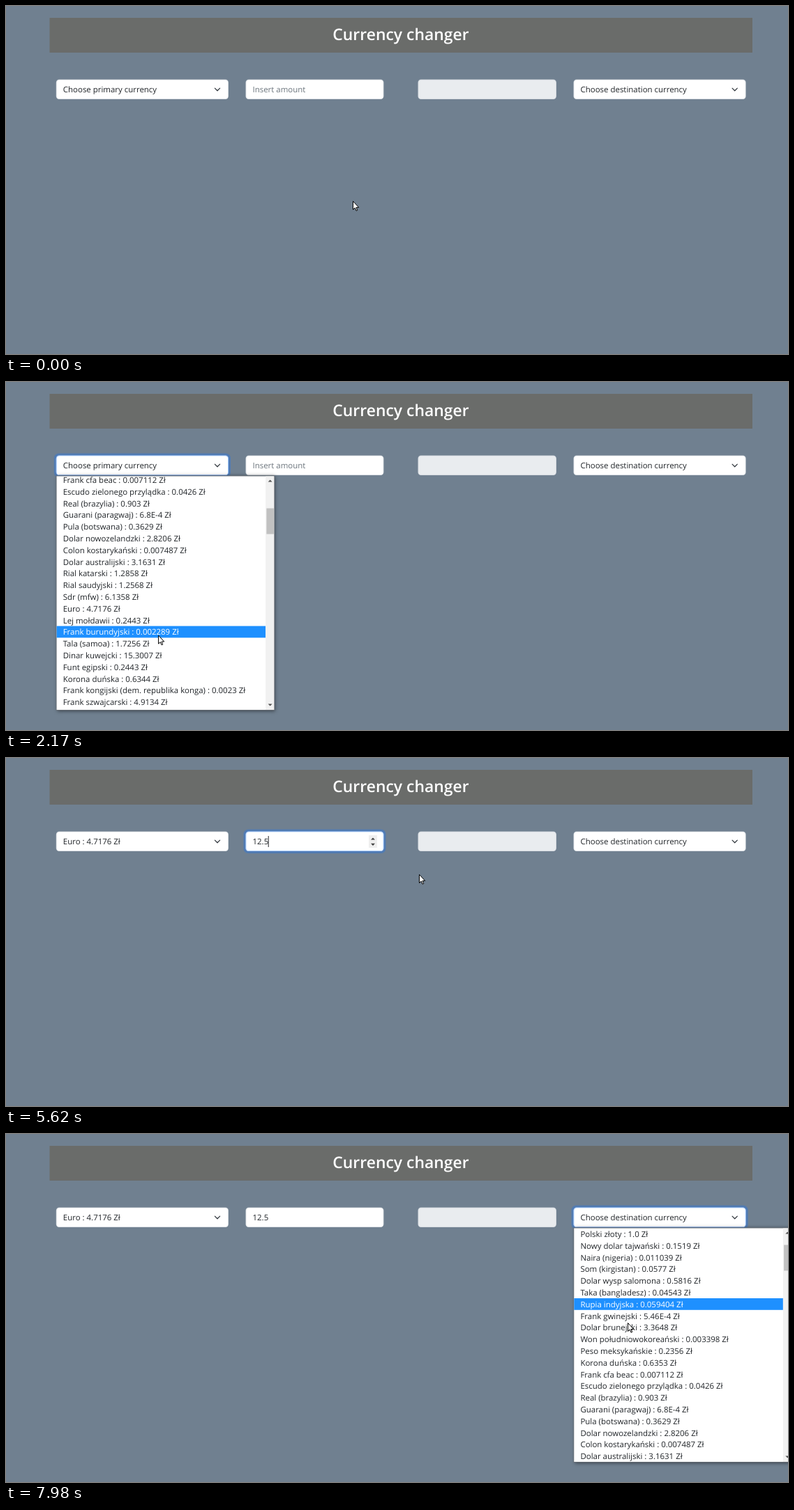
An HTML page with a canvas that plays this animation: 1121 px wide and 500 px high, repeating every 8 s.

```html
<!DOCTYPE html>
<html lang="en">
<head>
<meta charset="utf-8">
<title>Currency changer</title>
<style>
html, body { margin: 0; width: 100%; height: 100%; overflow: hidden; background: #708090; }
canvas { display: block; }
</style>
</head>
<body>
<canvas id="stage" width="1121" height="500"></canvas>
<script>
const ctx = document.getElementById('stage').getContext('2d');
const LOOP = 8000, TOP = 135.2, ROW = 16.8, LIST_W = 313.2, LIST_H = 335.8, HOVER_LAG = 75;
const FACE = '"Open Sans", "Noto Sans", sans-serif';
const BODY = '11.46px ' + FACE, TITLE = '600 22.95px ' + FACE;
const INK = '#212529', MUTED = '#6c757d';

const rates = `Dram (armenia) : 0.01167
Dolar fidżi : 2.1057
Gulden antyli holenderskich : 2.6215
Boliwiano (boliwia) : 0.6823
Rupia indonezyjska : 3.169E-4
Polski złoty : 1.0
Nowy dolar tajwański : 0.1519
Naira (nigeria) : 0.011039
Som (kirgistan) : 0.0577
Dolar wysp salomona : 0.5816
Taka (bangladesz) : 0.04543
Rupia indyjska : 0.059404
Frank gwinejski : 5.46E-4
Dolar brunejski : 3.3648
Won południowokoreański : 0.003398
Peso meksykańskie : 0.2356
Korona duńska : 0.6353
Frank cfa beac : 0.007112
Escudo zielonego przylądka : 0.0426
Real (brazylia) : 0.903
Guarani (paragwaj) : 6.8E-4
Pula (botswana) : 0.3629
Dolar nowozelandzki : 2.8206
Colon kostarykański : 0.007487
Dolar australijski : 3.1631
Rial katarski : 1.2858
Rial saudyjski : 1.2568
Sdr (mfw) : 6.1358
Euro : 4.7176
Lej mołdawii : 0.2443
Frank burundyjski : 0.002289
Tala (samoa) : 1.7256
Dinar kuwejcki : 15.3007
Funt egipski : 0.2443
Korona duńska : 0.6344
Frank kongijski (dem. republika konga) : 0.0023
Frank szwajcarski : 4.9134`.split('\n').map(s => s + ' Zł');

// Rows of [time, value, ...]
const mouse = [
  [200, 497, 280], [800, 240, 118], [1070, 240, 118], [1215, 236, 309],
  [1400, 234, 312], [1880, 218, 363], [2150, 218, 363], [2360, 220, 385],
  [2760, 214, 326], [3150, 214, 326], [3560, 442, 118], [5619, 442, 118],
  [5620, 592, 167], [6150, 925, 126], [6400, 925, 126], [7150, 908, 208],
  [7280, 905, 218], [7620, 891, 271]
];
const primaryScroll = [[1270, 0], [1470, 102], [1490, 102], [1690, 204], [1710, 204], [1910, 305.4]];
const targetScroll = [[7750, 0], [7970, 100.8]];
const presses = [[900, 1060], [3080, 3160], [3580, 3680], [6200, 6330]];
const typed = [[4360, '1'], [4620, '12'], [5020, '12.'], [5220, '12.5']];

const clamp = v => Math.min(1, Math.max(0, v));
const within = (t, a, b) => t >= a && t < b;
const fade = (t, on, off) => clamp((t - on) / 150) * (1 - clamp((t - off) / 150));

function tween(keys, t) {
  const i = keys.findIndex(k => k[0] > t);
  if (i === 0) return keys[0].slice(1);
  if (i < 0) return keys[keys.length - 1].slice(1);
  const a = keys[i - 1], b = keys[i];
  const p = (t - a[0]) / (b[0] - a[0]), e = p * p * (3 - 2 * p);
  return a.slice(1).map((v, j) => v + (b[j + 1] - v) * e);
}

function rect(x, y, w, h, color) {
  ctx.fillStyle = color;
  ctx.fillRect(x, y, w, h);
}

function text(s, x, y, color) {
  ctx.fillStyle = color;
  ctx.fillText(s, x, y);
}

function round(x, y, w, h, r, color) {
  ctx.fillStyle = color;
  ctx.beginPath();
  ctx.roundRect(x, y, w, h, r);
  ctx.fill();
}

function triangle(x, y, w, h, color) {
  ctx.fillStyle = color;
  ctx.beginPath();
  ctx.moveTo(x - w, y + h);
  ctx.lineTo(x + w, y + h);
  ctx.lineTo(x, y - h);
  ctx.fill();
}

function field(x, w, label, { color = INK, fill = '#fff', focus = 0, chevron = false } = {}) {
  if (focus) round(x - 3, 102.4, w + 6, 34.7, 7, `rgba(13,110,253,${0.3 * focus})`);
  round(x, 105.4, w, 28.7, 4.6, '#ced4da');
  if (focus) round(x, 105.4, w, 28.7, 4.6, `rgba(134,183,254,${focus})`);
  round(x + 0.8, 106.2, w - 1.6, 27.1, 3.9, fill);
  text(label, x + 10, 124, color);
  if (!chevron) return;
  ctx.strokeStyle = '#343a40';
  ctx.lineWidth = 1.3;
  ctx.lineCap = ctx.lineJoin = 'round';
  ctx.beginPath();
  ctx.moveTo(x + w - 19.6, 118.1);
  ctx.lineTo(x + w - 16, 121.7);
  ctx.lineTo(x + w - 12.4, 118.1);
  ctx.stroke();
}

// A dark box with a shadow, filled so that a thin border remains
function list(x, first, scroll, hover) {
  ctx.save();
  ctx.shadowColor = 'rgba(0,0,0,.5)';
  ctx.shadowBlur = 5;
  ctx.shadowOffsetX = ctx.shadowOffsetY = 1;
  rect(x, TOP - 0.8, LIST_W, LIST_H + 1.6, '#6b7178');
  ctx.restore();

  ctx.save();
  ctx.beginPath();
  ctx.rect(x + 0.8, TOP, LIST_W - 1.6, LIST_H);
  ctx.clip();
  rect(x, TOP, LIST_W, LIST_H, '#fff');
  [first, ...rates].forEach((label, i) => {
    const y = TOP + i * ROW - scroll;
    if (i === hover) rect(x, y, 300.4, ROW, '#1e90ff');
    text(label, x + 9.9, y + 12.8, i === hover ? '#fff' : INK);
  });
  rect(x + 300.4, TOP, 12.8, LIST_H, '#f1f1f1');
  rect(x + 301.6, 148.5 + scroll * 0.108, 10.5, 37, '#c1c1c1');
  triangle(x + 306.8, 142, 3, 1.6, scroll > 0 ? '#505050' : '#a3a3a3');
  triangle(x + 306.8, 464, 3, -1.6, '#505050');
  ctx.restore();
}

function amountField(t, x, y) {
  const value = typed.reduce((s, [at, v]) => t >= at ? v : s, '');
  const over = x > 343 && x < 542 && y > 105 && y < 134;
  const focused = within(t, 3600, 6200);
  field(343.5, 198, value || 'Insert amount', {
    color: value ? INK : MUTED,
    focus: fade(t, 3620, 6200)
  });
  if (over || focused) {
    rect(520, 111, 12, 18, '#efefef');
    triangle(526, 116, 3, 1.6, '#404040');
    triangle(526, 124.3, 3, -1.6, '#404040');
  }
  if (focused && !within(t, 4160, 4360))
    rect(353 + ctx.measureText(value).width, 112, 1, 16, INK);
  return over;
}

function pointer(t, x, y, beam) {
  if (presses.some(([a, b]) => within(t, a, b))) {
    ctx.fillStyle = 'rgba(255,255,0,.55)';
    ctx.beginPath();
    ctx.arc(x, y, 9, 0, 7);
    ctx.fill();
  }
  ctx.save();
  ctx.translate(x, y);
  ctx.strokeStyle = '#000';
  ctx.lineWidth = 1;
  ctx.lineCap = 'butt';
  ctx.lineJoin = 'miter';
  if (beam) {
    ctx.stroke(new Path2D('M-2.5-5.5H2.5M0-5.5V5.5M-2.5 5.5H2.5'));
  } else {
    const arrow = new Path2D('M.5 .5V12.5L3.2 10L5 14.2L6.7 13.5L5 9.4H8.7Z');
    ctx.fillStyle = '#fff';
    ctx.fill(arrow);
    ctx.stroke(arrow);
  }
  ctx.restore();
}

function draw(t) {
  const [x, y] = tween(mouse, t);
  const hovered = keys =>
    Math.max(0, Math.floor((y - TOP + tween(keys, t - HOVER_LAG)[0]) / ROW));

  rect(0, 0, 1121, 500, '#708090');
  rect(62.5, 17, 1007.5, 50, '#6a6c6a');
  ctx.textRendering = 'geometricPrecision';
  ctx.font = TITLE;
  ctx.textAlign = 'center';
  text('Currency changer', 566, 49, '#fff');
  ctx.font = BODY;
  ctx.textAlign = 'left';

  const primary = 'Choose primary currency', target = 'Choose destination currency';
  field(71.8, 247.2, t < 3120 ? primary : rates[28], { focus: fade(t, 900, 3620), chevron: true });
  const beam = amountField(t, x, y);
  field(590.5, 198.5, '', { fill: '#e9ecef' });
  field(813.5, 247.2, target, { focus: fade(t, 6200, LOOP), chevron: true });

  if (within(t, 940, 3120)) list(71.8, primary, tween(primaryScroll, t)[0], hovered(primaryScroll));
  if (t >= 6260) list(813.5, target, tween(targetScroll, t)[0], hovered(targetScroll));
  pointer(t, x, y, beam);
}

function frame() {
  draw(performance.now() % LOOP);
  requestAnimationFrame(frame);
}
frame();
</script>
</body>
</html>
```
